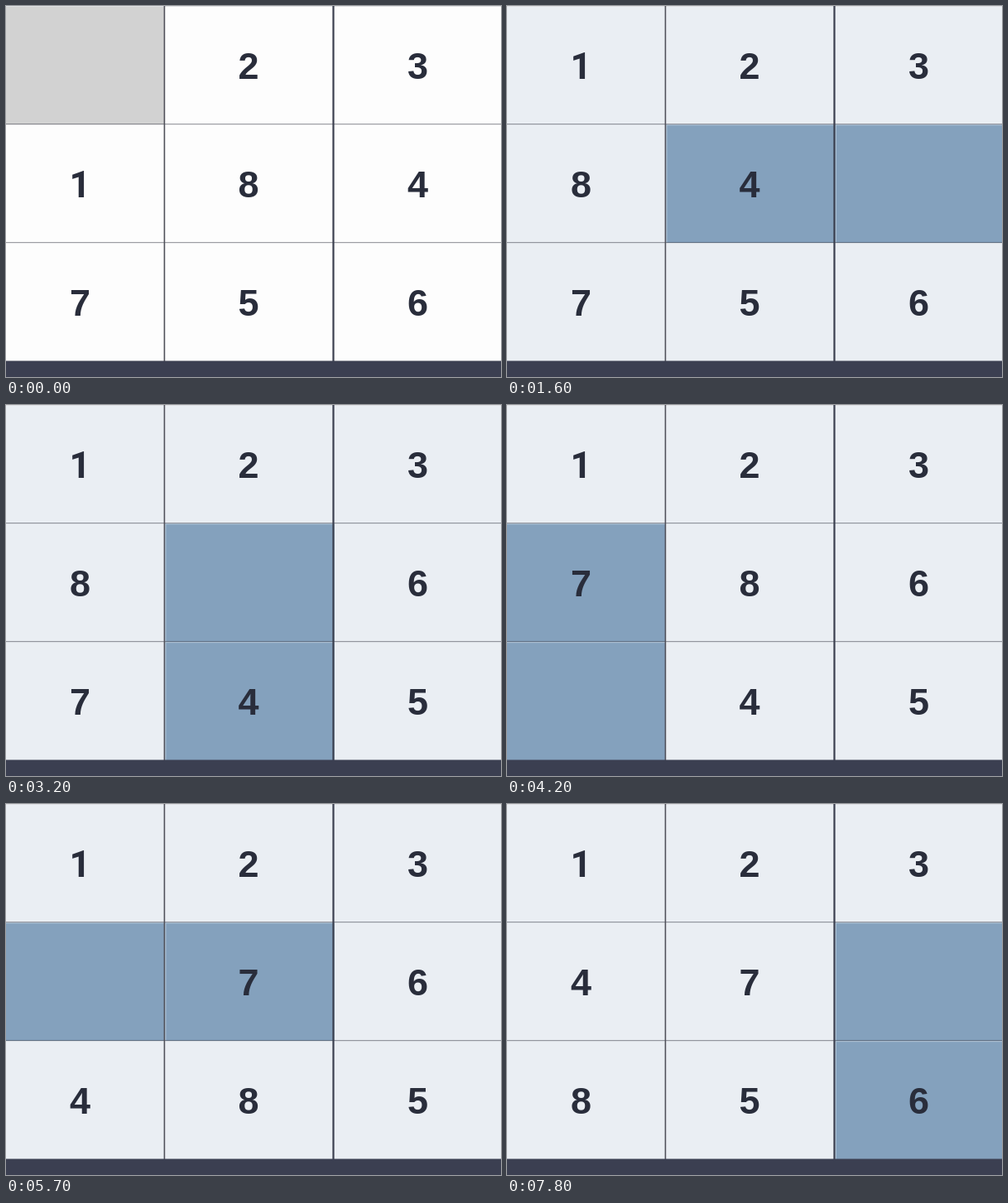
Recreate the animation shown at these times as an HTML page. Size 598x448 px, loop 8000 ms.

```html
<!DOCTYPE html>
<html>
<head>
<meta charset="utf-8">
<style>
html, body { margin: 0; width: 100%; height: 100%; overflow: hidden; }
svg { display: block; }
text { font: bold 45px "Liberation Sans", Arial, sans-serif; fill: #292d3b; text-anchor: middle; }
/* a numeral one without a foot */
.one { font-family: Roboto, sans-serif; }
</style>
</head>
<body>
<svg id="stage" width="598" height="448" viewBox="0 0 598 448"></svg>
<script>
const stage = document.getElementById("stage");
const START = "023184756";
// Cell the gap moves to at each step
const GAPS = [0, 3, 4, 5, 8, 7, 4, 3, 6, 7, 4, 3, 6, 7, 8, 5];
const LEFT = [-13, 192.2, 396.6], CENTER = [89.5, 293, 497.5];

function add(name, attrs) {
  const node = document.createElementNS("http://www.w3.org/2000/svg", name);
  for (const key in attrs) node.setAttribute(key, attrs[key]);
  return stage.appendChild(node);
}
function box(x, y, width, height, fill) {
  return add("rect", { x, y, width, height, fill });
}

const cells = [...START].map((_, i) => {
  const col = i % 3, row = Math.floor(i / 3), x = LEFT[col], y = row * 143;
  return {
    back: box(x, y, 205, 143, "#fdfdfd"),
    edges: [box(x, y, 205, 1.2, "#b3c7d9"), box(x, y, 1.2, 143, "#b3c7d9")],
    label: add("text", { x: CENTER[col], y: y + 87.5 })
  };
});
box(0, 0, 598, 1, "#dfe0e3");
for (const y of [142, 285]) box(0, y, 598, 1.2, "rgba(60,62,75,.5)");
box(190.6, 0, 1.6, 429, "#50515a");
box(394.4, 0, 2.2, 429, "#3b3f4f");
box(0, 428.5, 598, 20, "#3b3f51");

// Board after each step, with the two swapped cells
const boards = [{ tiles: [...START], changed: [] }];
for (let i = 1; i < GAPS.length; i++) {
  const tiles = [...boards[i - 1].tiles], from = GAPS[i - 1], to = GAPS[i];
  [tiles[from], tiles[to]] = [tiles[to], tiles[from]];
  boards.push({ tiles, changed: [from, to] });
}

function stepAt(t) {
  const early = Math.min(6, Math.floor((t - 100) / 500));
  return Math.max(early, Math.floor((t - 200) / 500));
}

let shown;
function frame(now) {
  const step = stepAt(now % 8000);
  if (step !== shown) {
    shown = step;
    const { tiles, changed } = boards[Math.max(0, step)];
    cells.forEach(({ back, edges, label }, i) => {
      const lit = changed.includes(i), empty = tiles[i] === "0";
      const idle = empty ? "#d2d2d2" : "#fdfdfd";
      back.setAttribute("fill", step < 0 ? idle : lit ? "#84a1bd" : "#eaeef3");
      for (const edge of edges) edge.setAttribute("visibility", lit ? "visible" : "hidden");
      label.textContent = empty ? "" : tiles[i];
      label.setAttribute("class", tiles[i] === "1" ? "one" : "");
    });
  }
  requestAnimationFrame(frame);
}
frame(performance.now());
</script>
</body>
</html>
```
